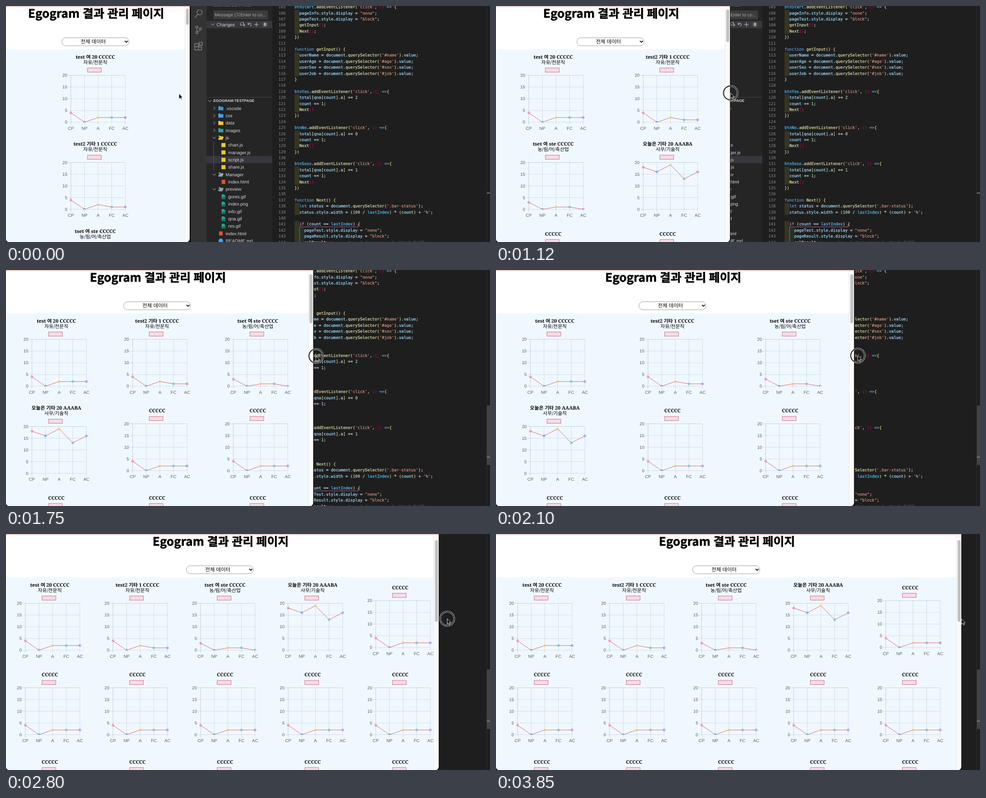
These frames come from a looping animation (1069x524 px, 3.92 s). An HTML page:

```html
<!DOCTYPE html>
<html lang="ko">
<head>
<meta charset="utf-8">
<title>Egogram</title>
<style>
  html, body { margin: 0; width: 100%; height: 100%; overflow: hidden; background: #000; }
  svg { display: block; width: 1069px; height: 524px; }
  text { white-space: pre; text-rendering: geometricPrecision; }
  .ui { font-family: "Liberation Sans", Arial, sans-serif; }
  .code { font-family: "DejaVu Sans Mono", monospace; }
  .serif { font-family: "Noto Serif", "Noto Sans CJK KR", "Noto Sans KR", serif; }
  .kr { font-family: "Noto Sans CJK KR", "Noto Sans KR", "Noto Sans CJK", sans-serif; }
</style>
</head>
<body>
<svg id="stage" viewBox="0 0 1069 524">
  <defs>
    <clipPath id="pageClip"><rect id="clipRect" y="-20" height="544" rx="7"/></clipPath>
    <clipPath id="plotClip"><rect x="-5" y="-5" width="132" height="109.4"/></clipPath>
  </defs>
</svg>
<script>
const stage = document.getElementById('stage');
const LOOP = 3920, TICK = 70;

function add(parent, tag, attrs = {}) {
  const node = document.createElementNS('http://www.w3.org/2000/svg', tag);
  for (const key in attrs) node.setAttribute(key, attrs[key]);
  parent.appendChild(node);
  return node;
}
const group = (parent, attrs) => add(parent, 'g', attrs);
const box = (parent, x, y, width, height, fill, more) =>
  add(parent, 'rect', { x, y, width, height, fill, ...more });
const line = (parent, d, stroke, width = 1, more) =>
  add(parent, 'path', { d, stroke, 'stroke-width': width, fill: 'none', ...more });
const dot = (parent, cx, cy, r, fill, more) =>
  add(parent, 'circle', { cx, cy, r, fill, ...more });

// Text placed by its vertical middle.
function label(parent, font, x, middle, size, fill, str, more) {
  const node = add(parent, 'text', { class: font, x, y: middle + size * 0.36, 'font-size': size, fill, ...more });
  node.textContent = str;
  return node;
}
const CENTER = { 'text-anchor': 'middle' }, END = { 'text-anchor': 'end' };

/* ---------- code editor ---------- */
const editor = group(stage);
box(editor, 408, 0, 661, 524, '#1e1e1e');
box(editor, 408, 0, 35, 524, '#333333');
box(editor, 443, 0, 145, 524, '#252526');

function activityBar() {
  const g = group(editor, { stroke: '#858585', 'stroke-width': 1.4, fill: 'none' });
  dot(g, 427.5, 14, 5.6, 'none');
  add(g, 'path', { d: 'M423.5 18.5L417 26' });
  dot(g, 421.5, 47, 2.4, 'none');
  dot(g, 421.5, 59, 2.4, 'none');
  dot(g, 429.5, 50.5, 2.4, 'none');
  add(g, 'path', { d: 'M421.5 49.5V56.5M429.5 53Q429 56 422.5 56.2' });
  add(g, 'path', { d: 'M417 83.5H425V97.5H417ZM417 90.5H432V97.5H425M427 80.5H433.5V87H427Z' });
}

function chevron(x, y, open) {
  line(editor, open ? `M${x - 3.5} ${y - 1.8}l3.5 3.6 3.5 -3.6` : `M${x - 1.8} ${y - 3.5}l3.6 3.5 -3.6 3.5`, '#c5c5c5');
}

function sourceControl() {
  label(editor, 'ui', 458, -2.5, 8.6, '#bbbbbb', 'SOURCE CONTROL');
  box(editor, 458, 10, 120.5, 19.5, '#3c3c3c');
  label(editor, 'ui', 461, 19, 10, '#a6a6a6', 'Message (⌘Enter to co...');
  box(editor, 443, 33, 145, 16.5, '#37373d');
  chevron(457, 41, true);
  label(editor, 'ui', 465, 41, 10.1, '#d6d6d6', 'Changes');
  line(editor, 'M518 36.5v6h5M520.5 36.5h4v4M526 39v6.5M522.5 42.5h6M534.5 37v4h4M535 41q2-4 5-2.5t0 6.5M548 41h10M553 36v10', '#c5c5c5', 1.1);
  dot(editor, 572, 41, 6.8, '#4d4d4d');
  label(editor, 'ui', 572, 41, 9, '#ffffff', '0', { ...CENTER, 'font-weight': 700 });
  box(editor, 443, 202, 145, 1, '#414142');
}

function folder(x, y, color, open) {
  add(editor, 'path', { fill: color, d: `M${x - 5.5} ${y - 4.5}h4l1.3 1.5h5.7v${open ? 2 : 7.5}h${open ? -8 : -11}z` });
  if (open) add(editor, 'path', { fill: color, d: `M${x - 5.5} ${y - 4}v8.5h9l2.5 -6h-8.5l-2 4z` });
}
const ICONS = {
  js: (x, y) => box(editor, x - 4.5, y - 4.5, 9, 9, '#f5c727'),
  html: (x, y) => box(editor, x - 4, y - 4.5, 8, 9, '#e0552c'),
  md: (x, y) => dot(editor, x, y, 5, '#42a5f5'),
  image(x, y) {
    add(editor, 'path', { fill: '#26a69a', d: `M${x - 4} ${y - 5}h5l3 3v7.2h-8z` });
    line(editor, `M${x - 2.7} ${y + 3.5}l2 -2.5 1.3 1.3 1.3 -1.8 1.3 3z`, '#252526', 0.9);
  }
};
const BLUE = '#42a5f5', YELLOW = '#ffca28', TEAL = '#26a69a', GRAY = '#90a4ae';
// name, folder colour or icon, depth, open
const TREE = [
  ['.vscode', '#2f9be0', 0], ['css', BLUE, 0], ['data', YELLOW, 0], ['images', TEAL, 0],
  ['js', YELLOW, 0, true],
  ['chart.js', 'js', 1], ['manager.js', 'js', 1], ['script.js', 'js', 1], ['share.js', 'js', 1],
  ['Manager', GRAY, 0, true], ['index.html', 'html', 1],
  ['preview', GRAY, 0, true],
  ['gores.gif', 'image', 1], ['index.png', 'image', 1], ['info.gif', 'image', 1],
  ['qna.gif', 'image', 1], ['res.gif', 'image', 1],
  ['index.html', 'html', 0], ['README.md', 'md', 0]
];

function fileTree() {
  chevron(450, 211, true);
  label(editor, 'ui', 458, 210.5, 8.3, '#d6d6d6', 'EGOGRAM-TESTPAGE', { 'font-weight': 700 });
  box(editor, 443, 333, 145, 16.3, '#37373d');
  box(editor, 458, 300.5, 1, 65, '#585858');
  TREE.forEach(([name, kind, depth, open], i) => {
    const y = 227 + i * 16.35, x = 474.5 + depth * 5.8;
    if (ICONS[kind]) ICONS[kind](x, y);
    else {
      chevron(460, y, open);
      folder(x, y, kind, open);
    }
    label(editor, 'ui', x + 10.5, y, 10.1, '#d6d6d6', name);
  });
}

const CHAR = 5.37, CODE_X = 637.2, CODE_SIZE = 8.92;
const answer = (name, points) =>
  `btn${name}.addEventListener('click', () =>{\n  total[qna[count].a] += ${points}\n  count += 1;\n  Next()\n})\n\n`;
const field = (name, id) => `  user${name} = document.querySelector('#${id}').value;\n`;
const SOURCE =
  `btnStart.addEventListener('click', () => {\n  pageInfo.style.display = "none";\n  pageTest.style.display = "block";\n` +
  '  getInput();\n  Next();\n})\n\nfunction getInput() {\n' +
  field('Name', 'name') + field('Age', 'age') + field('Sex', 'sex') + field('Job', 'job') + '}\n\n' +
  answer('Yes', 2) + answer('No', 0) + answer('Soso', 1) +
  "function Next() {\n  let status = document.querySelector('.bar-status');\n" +
  "  status.style.width = (100 / lastIndex) * (count) + '%';\n\n  if (count == lastIndex) {\n" +
  '    pageTest.style.display = "none";\n    pageResult.style.display = "block";\n    calResult();';

// Colours follow the order of the groups in TOKENS.
const TOKENS = /('[^']*'|"[^"]*")|( +)|(function|let|=>)|(if)|(\d+)|(\(\)(?=;| =>|$))|([[\](){}])|(btn\w+|lastIndex)|(\w+(?=\())|(\w+)|(.)/g;
const COLORS = ['#ce9178', '#46463f', '#569cd6', '#c586c0', '#b5cea8', '#a3134f', '#e6d28a', '#4fc1ff', '#dcdcaa', '#9cdcfe', '#d4d4d4'];

function codeLines() {
  SOURCE.split('\n').forEach((src, i) => {
    const y = 2.1 + i * 13.39, indent = src.search(/\S|$/) / 2;
    label(editor, 'code', 617.8, y, CODE_SIZE, '#8c8c8c', 105 + i, END);
    for (let k = 0; k < indent; k++)
      box(editor, CODE_X + k * CHAR * 2, y - 6.7, CHAR * 2, 13.4, k ? 'rgba(127,255,127,.08)' : 'rgba(255,255,64,.1)');
    const node = label(editor, 'code', CODE_X, y, CODE_SIZE, '#d4d4d4', '', { 'stroke-width': 0.25 });
    for (const match of src.matchAll(TOKENS)) {
      const kind = match.slice(1).findIndex(part => part !== undefined), blank = kind === 1;
      add(node, 'tspan', { fill: COLORS[kind], stroke: blank ? 'none' : COLORS[kind] })
        .textContent = blank ? '·'.repeat(match[0].length) : match[0];
    }
  });
  label(editor, 'code', 755, 524.3, CODE_SIZE, '#5a5a5a', 'You, 2 days ago • 2. Chart 동기화');
  line(editor, 'M777.5 484V490.5H648.5V524', '#a8609f');
}

activityBar();
sourceControl();
fileTree();
codeLines();
box(editor, 1061.5, 0, 1, 524, '#303031');
const slider = box(editor, 1062, 301, 7, 132, '#434343');
box(editor, 1062, 414.5, 7, 1.8, '#8a8a8a');

/* ---------- web page ---------- */
const edge = box(stage, 0, -20, 0, 546, '#0a0a0a', { rx: 7 });
const page = group(stage, { 'clip-path': 'url(#pageClip)' });
const clipRect = document.getElementById('clipRect');
box(page, 0, 0, 1069, 524, '#ffffff');
const panel = box(page, 1, 96, 0, 428, '#f0f8ff');

const header = group(page);
const HEADING = [['Egogram', -148.5], ['결과', -28], ['관리', 26.5], ['페이지', 80.5]];
for (const [word, x] of HEADING)
  label(header, 'kr', x, 16.5, 26, '#000', word, { 'font-weight': 700, stroke: '#000', 'stroke-width': 0.6 });
box(header, -74, 70.5, 148.5, 17.8, '#fff', { rx: 8.9, stroke: '#9c9c9c' });
label(header, 'kr', -4.5, 79, 11.4, '#000', '전체 데이터', CENTER);
line(header, 'M65.2 77.3l3.3 3.3 3.3 -3.3', '#000', 1.8);

const STEP = 30.1, PLOT_W = STEP * 4, PLOT_H = 104;
const POINTS = ['255,99,132', '54,162,235', '255,206,86', '75,192,192', '153,102,255'];
const PEOPLE = [
  ['test 여 20 CCCCC', '자유/전문직', [4, 0, 2, 2, 2]],
  ['test2 기타 1 CCCCC', '자유/전문직', [4, 0, 2, 1, 1]],
  ['tset 여 ste CCCCC', '농/림/어/축산업', [3, 0, 1, 1, 0]],
  ['오늘은 기타 20 AAABA', '사무/기술직', [18, 16, 19, 13, 16]]
];
const BLANK = ['CCCCC', '', [4, 0, 2, 2, 2]];

// One card; its origin is the column centre and the top of the first row.
function card([title, job, values]) {
  const g = group(page), shift = job ? 0 : 6;
  label(g, 'serif', 0, 113 + shift, 10.8, '#000', title, { ...CENTER, 'font-weight': 700 });
  label(g, 'serif', 0, 125, 10.8, '#000', job, CENTER);
  box(g, -17.3, 137.6 - shift, 30.6, 9.3, '#f8dae5', { stroke: '#c4748b' });

  const plot = group(g, { transform: `translate(-54 ${154 - shift})` });
  for (let i = 0; i < 5; i++) {
    const x = i * STEP, y = i * PLOT_H / 4;
    line(plot, `M${x} 0V${PLOT_H + 6}M-6 ${y}H${PLOT_W}`, i ? 'rgba(40,70,90,.15)' : 'rgba(40,70,90,.22)');
    label(plot, 'ui', -8, y, 9.6, '#5c5c5c', 20 - i * 5, END);
    label(plot, 'ui', x, PLOT_H + 13.2, 9.6, '#5c5c5c', ['CP', 'NP', 'A', 'FC', 'AC'][i], CENTER);
  }
  const level = v => PLOT_H * (1 - v / 20);
  const inner = group(plot, { 'clip-path': 'url(#plotClip)' });
  line(inner, 'M' + values.map((v, i) => `${i * STEP} ${level(v)}`).join('L'), '#d9666f');
  values.forEach((v, i) =>
    dot(inner, i * STEP, level(v), 2.3, `rgba(${POINTS[i]},.25)`, { stroke: `rgb(${POINTS[i]})`, 'stroke-width': 0.9 }));
  return g;
}
const cards = Array.from({ length: 15 }, (_, i) => card(PEOPLE[i] || BLANK));

const bar = group(page);
box(bar, 0, 0, 12, 524, '#fbfbfb');
box(bar, 0, 0, 1, 524, '#e6e6e6');
const thumb = box(bar, 3, 0, 6.5, 36, '#c1c1c1', { rx: 3.2 });
box(page, 0, 0, 1069, 1.3, '#dfa49c');

/* ---------- pointer ---------- */
const pointer = group(stage);
const ring = group(pointer, { fill: 'none' });
dot(ring, 0, 0, 15.5, 'none', { stroke: '#dcdcdc', 'stroke-width': 3.4 });
dot(ring, 0, 0, 15.5, 'none', { stroke: '#111', 'stroke-width': 1.8 });
add(pointer, 'path', {
  d: 'M0 0V12L2.8 9.4 4.7 13.6 6.6 12.8 4.7 8.7H8.4Z',
  fill: '#000', stroke: '#fff', 'stroke-width': 0.9, 'stroke-linejoin': 'round'
});

/* ---------- motion ---------- */
// time, pointer x, pointer y, window width
const DRAG = [
  [0, 382, 194.5, 405.5], [70, 400, 190, 405.5], [140, 400, 190, 405.5],
  [350, 404, 189, 405.5], [420, 404, 189, 405.5], [490, 407, 194, 407],
  [840, 455, 194, 454], [1400, 581, 192, 579], [1540, 616, 191.5, 611],
  [2100, 799, 190, 790.5], [2520, 912, 188.5, 884], [2660, 954, 188, 925],
  [2940, 995, 188, 986], [3080, 995, 188, 986], [3150, 1007, 188.5, 994.5],
  [3290, 1022, 188.5, 1014], [3430, 1022, 188.5, 1014],
  [3500, 1024, 188.5, 1016], [3850, 1028, 188.5, 1027.5]
];

function dragAt(t) {
  const next = DRAG.findIndex(row => row[0] > t);
  if (next < 0) return DRAG[DRAG.length - 1].slice(1);
  const a = DRAG[next - 1], b = DRAG[next], k = (t - a[0]) / (b[0] - a[0]);
  return [1, 2, 3].map(i => a[i] + (b[i] - a[i]) * k);
}

const columnsFor = width => width < 453 ? 1 : width < 575 ? 2 : width < 906 ? 3 : 5;
const move = (node, x, y) => node.setAttribute('transform', `translate(${x} ${y})`);
const show = (node, on) => node.setAttribute('visibility', on ? 'visible' : 'hidden');

function render(t) {
  const [x, y, width] = dragAt(t);
  const inner = width - 11, cols = columnsFor(width), slot = Math.max(inner / cols, 193.5);
  clipRect.setAttribute('width', width);
  edge.setAttribute('width', width + 1.5);
  panel.setAttribute('width', inner - 1);
  move(header, inner / 2, 0);
  move(bar, inner, 0);
  thumb.setAttribute('y', 3.6 + cols * 2.05);
  thumb.setAttribute('height', cols * 36.2);
  cards.forEach((node, i) => {
    const row = Math.floor(i / cols);
    show(node, row < 3);
    move(node, (i % cols + 0.5) * slot, row * 193.5);
  });
  move(pointer, x, y);
  show(ring, t >= 490 && t < 3780);
  show(slider, t >= 1610);
}

function loop() {
  const t = performance.now() % LOOP;
  render(Math.floor(t / TICK) * TICK);
  requestAnimationFrame(loop);
}
loop();
</script>
</body>
</html>
```
